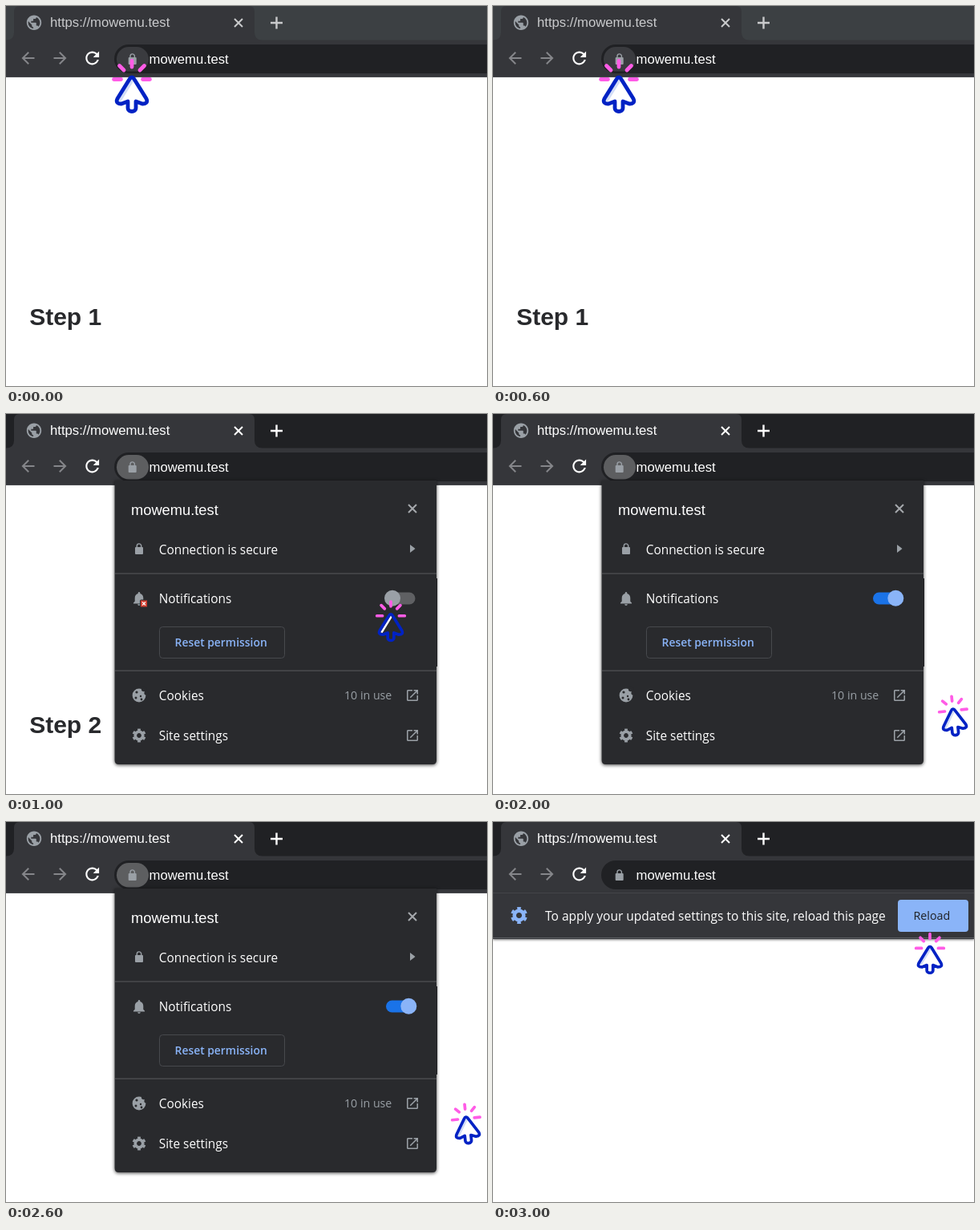
Write an HTML page that moves like this. It is 600 by 474 pixels and loops after 4000 ms.

```html
<!DOCTYPE html>
<html lang="en">
<head>
<meta charset="utf-8">
<title>Allow notifications</title>
<style>
html, body { margin: 0; width: 100%; height: 100%; overflow: hidden; background: #fff; }
svg {
  display: block; width: 100vw; height: 100vh;
  --strip: #202124; --label: #fff; --pill: #5d5e60;
  --arrow: #fff; --shade: #d3ddf6;
}
svg[data-step="0"] { --strip: #3c4043; --label: #c9cacc; --pill: #3a3b3f; }
svg[data-step="1"] { --arrow: none; --shade: #fff; }
text { font: 15.4px "Open Sans", "Noto Sans", sans-serif; fill: #fff; }
.url { font: 16.7px "Liberation Sans", Arial, sans-serif; }
.step { font: bold 30px "Liberation Sans", Arial, sans-serif; fill: #28292c; }
.grey { fill: #9aa0a6; }
.line { fill: none; stroke-width: 2; }
</style>
</head>
<body>
<svg viewBox="0 0 600 474">
  <defs>
    <g id="lock">
      <rect x="-5" y="-2" width="10" height="9" rx="1"/>
      <path d="M-2.7-2v-1.4a2.7 2.7 0 0 1 5.4 0V-2" fill="none" stroke="#9aa0a6" stroke-width="1.4"/>
    </g>
    <path id="back" d="M8-1H-4.17l5.59-5.59L0-8l-8 8 8 8 1.41-1.41L-4.17 1H8z"/>
    <path id="cross" class="line" d="M-5-5 5 5M5-5-5 5"/>
    <path id="open" d="M19 19H5V5h7V3H5c-1.1 0-2 .9-2 2v14c0 1.1.9 2 2 2h14c1.1 0 2-.9 2-2v-7h-2zM14 3v2h3.6l-9.8 9.8 1.4 1.4L19 6.4V10h2V3z"/>
    <g id="gear" fill="none" stroke="currentColor">
      <circle r="5.4" stroke-width="4.2"/>
      <circle r="8.3" stroke-width="2.8" pathLength="12" stroke-dasharray="1" stroke-dashoffset="-.5"/>
    </g>
  </defs>

  <!-- Tab strip and toolbar -->
  <rect width="600" height="43" fill="var(--strip)"/>
  <path d="M0 42.5Q10 42.5 10 33V7Q10 0 17 0H303Q310 0 310 7V33Q310 42.5 320 42.5H600V89H0z" fill="#35363a"/>
  <rect y="88" width="600" height="1" fill="#4a4c50"/>
  <path class="grey" transform="translate(35 20.7) scale(.92) translate(-12 -12)" d="M12 2C6.48 2 2 6.48 2 12s4.48 10 10 10 10-4.48 10-10S17.52 2 12 2zm-1 17.93c-3.95-.49-7-3.85-7-7.93 0-.62.08-1.21.21-1.79L9 15v1c0 1.1.9 2 2 2v1.93zm6.9-2.54c-.26-.81-1-1.39-1.9-1.39h-1v-3c0-.55-.45-1-1-1H8v-2h2c.55 0 1-.45 1-1V7h2c1.1 0 2-.9 2-2v-.41c2.93 1.19 5 4.06 5 7.41 0 2.08-.8 3.97-2.1 5.39z"/>
  <text class="url" x="55" y="26" style="fill:var(--label)">https://mowemu.test</text>
  <use href="#cross" x="290" y="21" stroke="var(--label)"/>
  <path class="line" d="M330 21h15M337.5 13.5v15" stroke="var(--label)" style="stroke-width:2.4"/>
  <g fill="#85868a">
    <use href="#back" x="27.5" y="65"/>
    <use href="#back" transform="translate(67.5 65) scale(-1 1)"/>
  </g>
  <path fill="#fff" transform="translate(107.7 65) scale(1.05) translate(-12 -12)" d="M17.65 6.35C16.2 4.9 14.2 4 12 4c-4.4 0-8 3.6-8 8s3.6 8 8 8c3.7 0 6.8-2.5 7.7-6h-2.1c-.8 2.3-3 4-5.6 4-3.3 0-6-2.7-6-6s2.7-6 6-6c1.7 0 3.1.7 4.2 1.8L13 11h7V4z"/>
  <rect x="135" y="48" width="500" height="36" rx="18" fill="#202124"/>
  <rect data-on="012" x="138" y="51" width="40" height="30.5" rx="15.2" fill="var(--pill)"/>
  <use href="#lock" class="grey" x="157.7" y="66"/>
  <text class="url" x="178.5" y="72">mowemu.test</text>

  <text class="step" data-on="0" x="29.2" y="397.5">Step 1</text>
  <text class="step" data-on="1" x="29.2" y="397.5">Step 2</text>

  <!-- Site panel -->
  <g data-on="12">
    <path d="M135.6 83H537V432q0 5-5 5H140.600q-5 0-5-5z" fill="#292a2d" style="filter:drop-shadow(0 1px 2px #000b)"/>
    <rect x="537" y="205" width="1" height="110" fill="#202124"/>
    <path d="M136 199h401M136 320.2h401" stroke="#4a4b4e" stroke-width="1.4"/>
    <text class="url" x="156" y="126" style="font-size:18.3px">mowemu.test</text>
    <use href="#cross" x="507" y="118" stroke="#a5a8ac"/>
    <g class="grey">
      <use href="#lock" x="166" y="168"/>
      <path d="M504 163l6.5 5-6.5 5z"/>
      <path transform="translate(166 230.5) scale(.88) translate(-12 -12.2)" d="M12 22c1.1 0 2-.9 2-2h-4c0 1.1.9 2 2 2zm6-6v-5c0-3.1-1.6-5.6-4.5-6.3V4c0-.8-.7-1.5-1.5-1.5s-1.5.7-1.5 1.500v.7C7.6 5.4 6 7.9 6 11v5l-2 2v1h16v-1z"/>
      <circle cx="166" cy="351" r="8.4"/>
      <use href="#open" transform="translate(507 351) scale(.78) translate(-12 -12)"/>
      <use href="#open" transform="translate(507 401) scale(.78) translate(-12 -12)"/>
    </g>
    <g fill="#292a2d">
      <circle cx="172" cy="343" r="3.2"/>
      <circle cx="175" cy="348" r="2.6"/>
      <circle cx="163" cy="347" r="1.6"/>
      <circle cx="162" cy="354" r="1.5"/>
      <circle cx="168" cy="352" r="1.2"/>
      <circle cx="169" cy="356" r="1.4"/>
    </g>
    <use href="#gear" color="#9aa0a6" transform="translate(166 401) scale(.88)"/>
    <text x="190.7" y="175">Connection is secure</text>
    <text x="190.7" y="236">Notifications</text>
    <text x="190.7" y="357">Cookies</text>
    <text x="190.7" y="407">Site settings</text>
    <text x="422" y="356" style="font-size:14.2px;fill:#9aa0a6">10 in use</text>
    <rect x="191.5" y="265.5" width="156" height="39" rx="4" fill="none" stroke="#47494d"/>
    <text x="210.5" y="290" style="font-size:13.9px;font-weight:600;fill:#8ab4f8">Reset permission</text>
  </g>
  <g data-on="1">
    <rect x="167.5" y="232" width="9" height="9" rx="1" fill="#d23f31" stroke="#292a2d"/>
    <path d="M170 234.5l4 4M174 234.5l-4 4" stroke="#fff" stroke-width="1.2"/>
    <rect x="474" y="222.5" width="36.500" height="15" rx="7.5" fill="#5f6063"/>
    <circle class="grey" cx="482" cy="229.7" r="10"/>
  </g>
  <g data-on="2">
    <rect x="474" y="222.5" width="36" height="15" rx="7.5" fill="#1a73e8"/>
    <circle cx="502.3" cy="229.7" r="10" fill="#8ab4f8"/>
  </g>

  <!-- Reload bar -->
  <g data-on="3">
    <rect y="89" width="600" height="57" fill="#35363a" style="filter:drop-shadow(0 1px 1.5px #0008)"/>
    <rect y="144" width="600" height="1" fill="#5c5e62"/>
    <use href="#gear" color="#8ab4f8" transform="translate(32.5 116.5) scale(1.08)"/>
    <text x="65" y="123" style="font-size:15.5px">To apply your updated settings to this site, reload this page</text>
    <rect x="505" y="97" width="88" height="40" rx="4" fill="#8ab4f8"/>
    <text x="524.5" y="122" style="font-size:14.3px;fill:#202124">Reload</text>
  </g>

  <g id="cursor" stroke-linecap="round" stroke-linejoin="round" stroke-width="4.8">
    <path d="M0-20.5v7.5M-15.5-14.5l5.5 5.5M15.5-14.5l-5.5 5.5M-22.5 2.5h9M22.5 2.5h-9" stroke="#ff5ce6"/>
    <path id="arrow" d="M0 0q1.6 0 2.6 1.7L18 26.5Q21 33 13 33L5 30v8.5a5 4 0 0 1-10 0V30l-8 3Q-21 33-18 26.5L-2.6 1.7Q-1.6 0 0 0z" fill="var(--arrow)"/>
    <path d="M0 2-17 29l3.500 1L2 5z" fill="var(--shade)"/>
    <use href="#arrow" style="--arrow:none" stroke="#0022c4"/>
  </g>
</svg>
<script>
const svg = document.querySelector('svg');
const cursor = document.getElementById('cursor');
const parts = document.querySelectorAll('[data-on]');
// Cursor tip x, y, scale and angle for each step
const poses = [[157, 89, 1, 0], [480, 249.8, .77, 0], [573.7, 368, .77, -6], [545, 155.5, .77, 0]];
let start;

function draw(now) {
  start ??= now;
  const step = Math.floor((now - start) / 1000) % 4;
  const [x, y, scale, angle] = poses[step];
  svg.dataset.step = step;
  for (const part of parts) part.style.display = part.dataset.on.includes(step) ? '' : 'none';
  cursor.setAttribute('transform', `translate(${x} ${y}) rotate(${angle}) scale(${scale})`);
  requestAnimationFrame(draw);
}
requestAnimationFrame(draw);
</script>
</body>
</html>
```
